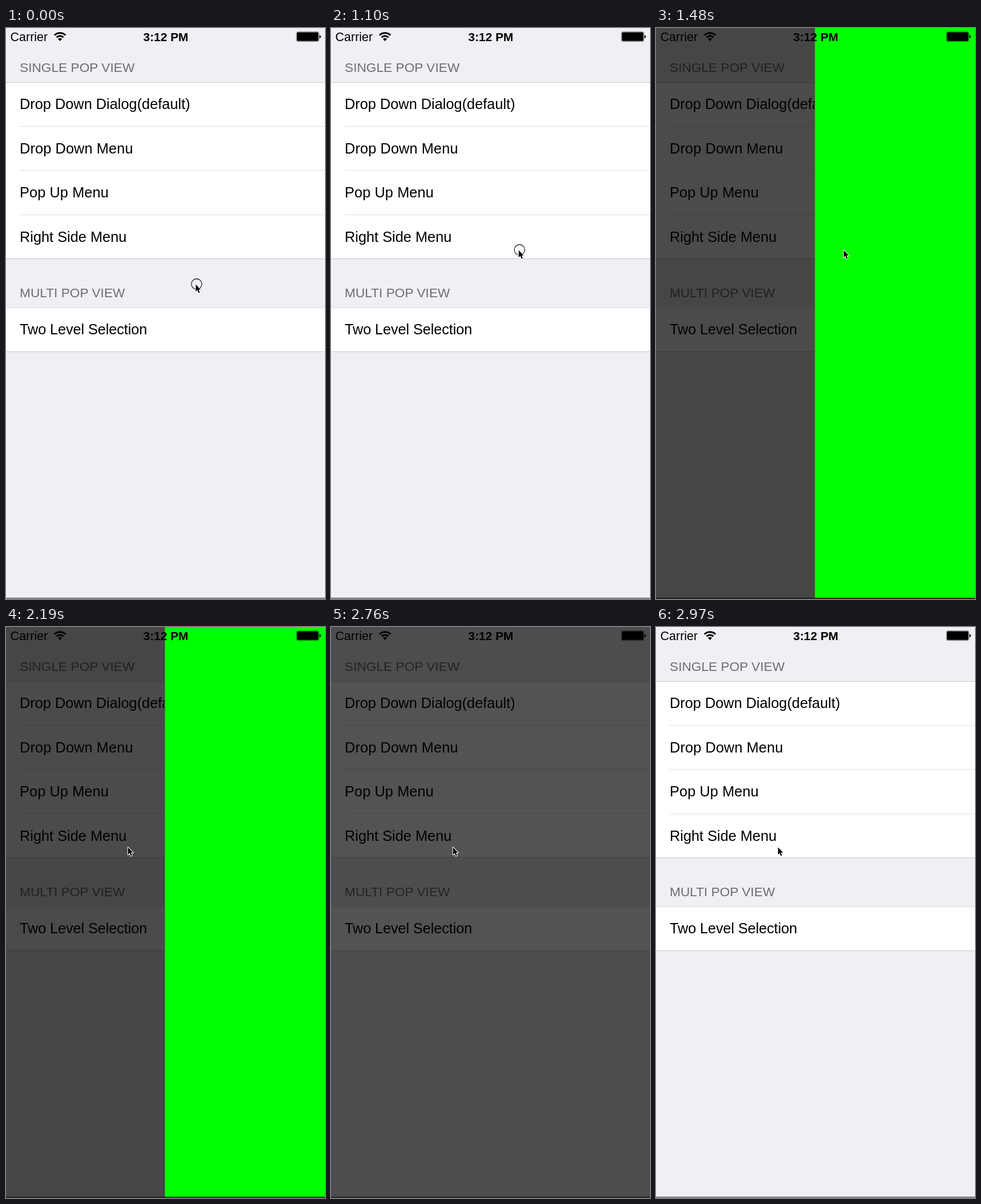
An HTML page for the animation above (3070 ms loop, 559 by 1001 pixels).

```html
<!DOCTYPE html>
<html lang="en">
<head>
<meta charset="utf-8">
<title>Side menu demo</title>
<style>
  html, body { margin: 0; width: 100%; height: 100%; overflow: hidden; background: #efeff4; }
  svg { display: block; width: 559px; height: 1001px; }
  text { font-family: "Liberation Sans", Arial, sans-serif; }
  .head { font-size: 22.7px; fill: #6d6d72; }
  .row { font-size: 25.35px; fill: #000; }
</style>
</head>
<body>
<svg viewBox="0 0 559 1001" xmlns="http://www.w3.org/2000/svg">
  <rect width="559" height="1001" fill="#efeff4"/>
  <g id="list"></g>
  <rect y="999" width="559" height="1" fill="#000"/>
  <rect y="1000" width="559" height="1" fill="#fafafa"/>
  <rect id="dim" width="559" height="1001" fill="#000" opacity="0"/>
  <rect id="panel" x="559" width="281" height="999" fill="#0f0"/>

  <g id="status">
    <text x="7.5" y="23" font-size="21.5">Carrier</text>
    <text x="280" y="23" font-size="20.9" font-weight="700" text-anchor="middle">3:12 PM</text>
    <g fill="none" stroke="#000" stroke-width="3">
      <path d="M84.9 12.6A14 14 0 0 1 104.3 12.6"/>
      <path d="M88.6 16.4A8.6 8.6 0 0 1 100.6 16.4"/>
    </g>
    <path d="M94.6 22.9L91 19.1A5.2 5.2 0 0 1 98.2 19.1Z"/>
    <rect x="508.9" y="6.7" width="39.4" height="17" rx="2.6" fill="none" stroke="#000" stroke-opacity=".55" stroke-width=".9"/>
    <rect x="509.8" y="7.6" width="37.6" height="15.2" rx="1.8"/>
    <path d="M549.4 12.2Q551.9 13 551.9 15.2T549.4 18.2Z"/>
  </g>

  <g id="pointer">
    <circle id="ring" cx="1.5" cy="-.6" r="9.2" fill="none" stroke="#000" stroke-width="1.1"/>
    <path d="M0 0V12.6L2.9 10L5.1 15L7.1 14.1L5 9.3H8.9Z" fill="#000" stroke="#fff" stroke-width="2.1" paint-order="stroke" stroke-linejoin="round"/>
  </g>
</svg>
<script>
const $ = id => document.getElementById(id);
const LOOP = 3070, WIDTH = 559, PANEL = 280.5, DIM = 0.705;

const rect = (x, y, h, fill) =>
  `<rect x="${x}" y="${y}" width="${WIDTH - x}" height="${h}" fill="${fill}"/>`;
const label = (kind, y, str, gap = 0) =>
  `<text class="${kind}" x="24" y="${y}" letter-spacing="${gap}">${str}</text>`;

$('list').innerHTML =
  rect(0, 95, 310, '#fff') + rect(0, 490, 78, '#fff') +
  [95, 404, 567].map(y => rect(0, y, 1, '#c8c7cc')).join('') +
  rect(0, 490, 1, '#dddce1') +
  [172, 249, 327].map(y => rect(24, y, 1, '#e0dfe3')).join('') +
  label('head', 77.2, 'SINGLE POP VIEW') +
  label('head', 472.4, 'MULTI POP VIEW') +
  label('row', 142, 'Drop Down Dialog(default)') +
  label('row', 219.7, 'Drop Down Menu', 0.1) +
  label('row', 297.3, 'Pop Up Menu', 0.08) +
  label('row', 375, 'Right Side Menu') +
  label('row', 537.3, 'Two Level Selection', -0.12);

// The picture refreshes only at these moments and holds in between.
const ticks = [
  0, 60, 510, 570, 630, 680, 740, 1100, 1150, 1220, 1300, 1480, 1810,
  1960, 2020, 2080, 2130, 2190, 2490, 2550, 2620, 2690, 2760, 2820, 2970
];

const ease = (t, from, to) => {
  const k = Math.min(1, Math.max(0, (t - from) / (to - from)));
  return k * k * (3 - 2 * k);
};
const taps = [[0, 60], [1100, 1150], [2490, 2550]];

function draw(now) {
  const time = now % LOOP;
  const t = ticks.filter(v => v <= time).pop();

  const up = ease(t, 455, 740);
  const left = ease(t, 1905, 2190);
  const nudge = t >= 1810 ? 1 : 0;
  const x = 332.5 - 3.6 * up - 3.5 * nudge - 111.6 * left;
  const y = 449.4 - 60 * up - 3.1 * left;
  $('pointer').setAttribute('transform', `translate(${x} ${y})`);
  $('ring').setAttribute('visibility', taps.some(([a, b]) => t >= a && t < b) ? 'visible' : 'hidden');

  const open = ease(t, 1161, 1461) - ease(t, 2500, 2740);
  $('panel').setAttribute('x', WIDTH - PANEL * open);
  const shade = ease(t, 1102, 1402) - ease(t, 2731, 2970);
  $('dim').setAttribute('opacity', DIM * shade);
}

const start = performance.now();
function loop() {
  draw(performance.now() - start);
  requestAnimationFrame(loop);
}
loop();
</script>
</body>
</html>
```
